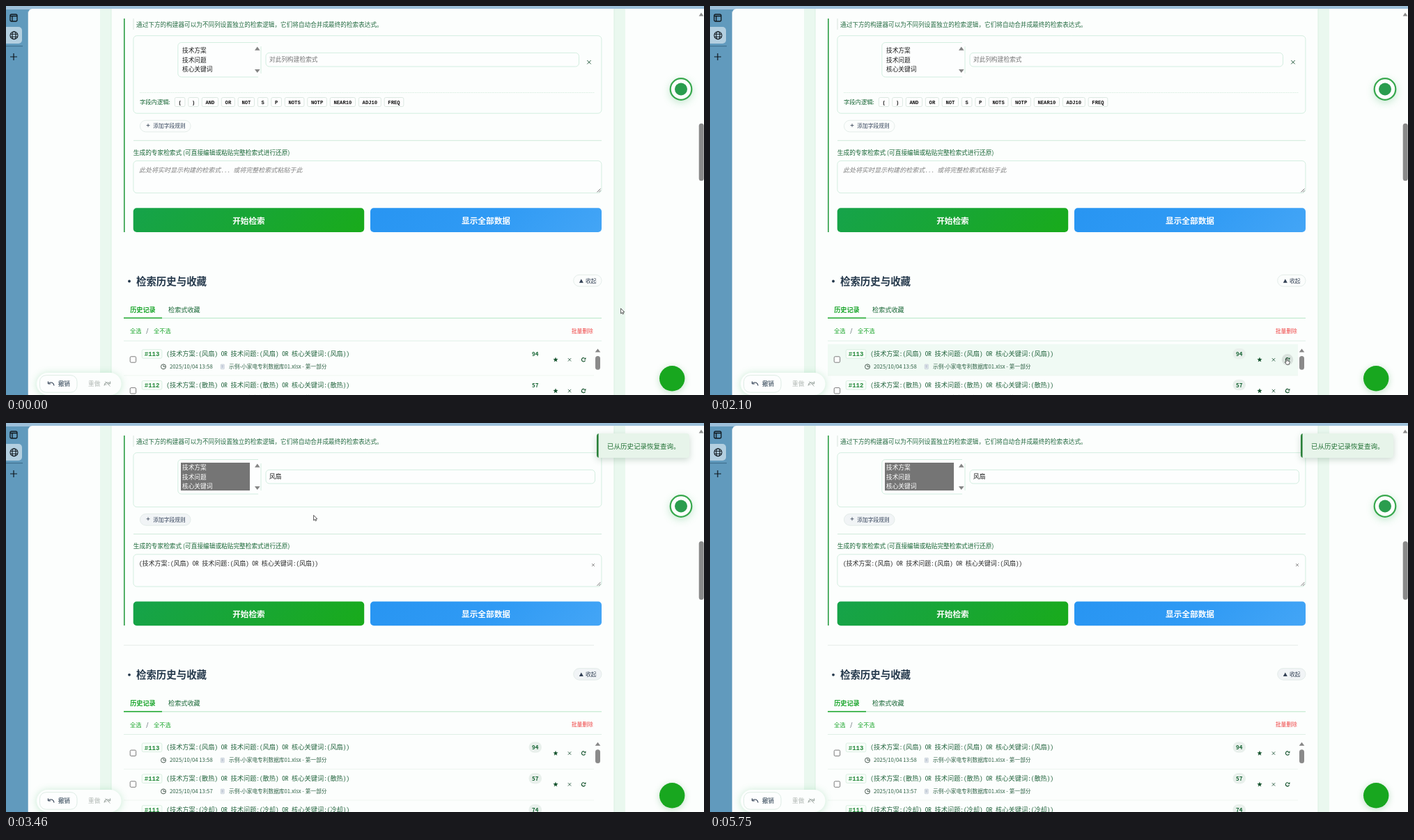
Write an HTML page with a canvas that moves like this. It is 1002 px wide and 559 px high and loops after 5890 ms.

```html
<!DOCTYPE html>
<html lang="zh-CN">
<head>
<meta charset="utf-8">
<title>检索历史</title>
<style>
html, body { margin: 0; width: 100%; height: 100%; overflow: hidden; background: #fcfefd; }
canvas { display: block; width: 1002px; height: 559px; }
</style>
</head>
<body>
<canvas id="stage"></canvas>
<script>
const W = 1002, H = 559, LOOP = 5890;
const canvas = document.getElementById('stage');
const dpr = window.devicePixelRatio || 1;
canvas.width = W * dpr;
canvas.height = H * dpr;
const g = canvas.getContext('2d');

const SANS = '"Noto Sans CJK SC", "Noto Sans SC", sans-serif';
const WIDE = '"Noto Sans Mono CJK SC", "Noto Sans CJK SC", monospace';
const MONO = '"Liberation Mono", monospace';
const GREEN = '#19a52a', FOREST = '#166534', SLATE = '#334155', LINE = '#d3eee0';

// time, x, y, shape
const PATH = [
  [0, 882, 434, 'arrow'], [430, 800, 480, 'arrow'], [560, 640, 520, 'arrow'], [690, 549, 532, 'arrow'],
  [840, 522, 545, 'arrow'], [1000, 530, 526, 'arrow'], [1150, 530, 523, 'arrow'], [1290, 531, 521, 'arrow'],
  [1540, 596, 517, 'arrow'], [1690, 700, 513, 'arrow'], [1810, 808, 505, 'arrow'], [1960, 825, 506, 'hand'],
  [2500, 829, 505, 'busy'], [2910, 829, 505, 'arrow'], [3310, 770, 385, 'arrow'], [3460, 441, 132, 'arrow'],
  [3590, 360, 148, 'arrow'], [3710, 332, 154, 'arrow'], [3850, 327, 192, 'beam'], [4260, 280, 165, 'arrow'],
  [4390, 240, 107, 'arrow'], [4510, 235, 138, 'hand'], [4670, 235, 147, 'hand'], [4810, 479, 243, 'arrow'],
  [4940, 0, 0, 'none'], [5210, 998, 546, 'arrow'], [5360, 993, 545, 'arrow'], [5490, 992, 545, 'arrow'],
  [5630, 988, 550, 'arrow'], [5750, 0, 0, 'none']
];

const within = (t, a, b) => t >= a && t < b;

function text(s, x, y, size, color, o = {}) {
  g.font = `${o.style || ''} ${o.weight || 400} ${size}px ${o.font || SANS}`;
  g.textAlign = o.align || 'left';
  g.fillStyle = color;
  g.fillText(s, x, y + size * 0.37);
}

function box(x, y, w, h, r, fill, stroke, lw = 1) {
  g.beginPath();
  g.roundRect(x, y, w, h, r);
  if (fill) { g.fillStyle = fill; g.fill(); }
  if (stroke) { g.strokeStyle = stroke; g.lineWidth = lw; g.stroke(); }
}

function rect(x, y, w, h, fill) {
  g.fillStyle = fill;
  g.fillRect(x, y, w, h);
}

function disc(x, y, r, fill, stroke, lw = 1) {
  g.beginPath();
  g.arc(x, y, r, 0, Math.PI * 2);
  if (fill) { g.fillStyle = fill; g.fill(); }
  if (stroke) { g.strokeStyle = stroke; g.lineWidth = lw; g.stroke(); }
}

function lines(points, color, lw = 1) {
  g.beginPath();
  for (const [x1, y1, x2, y2] of points) { g.moveTo(x1, y1); g.lineTo(x2, y2); }
  g.strokeStyle = color;
  g.lineWidth = lw;
  g.stroke();
}

function shape(points, fill, stroke, lw = 1) {
  g.beginPath();
  points.forEach(([x, y], i) => i ? g.lineTo(x, y) : g.moveTo(x, y));
  g.closePath();
  if (fill) { g.fillStyle = fill; g.fill(); }
  if (stroke) { g.strokeStyle = stroke; g.lineWidth = lw; g.stroke(); }
}

function shadow(color, blur, dy, draw) {
  g.save();
  g.shadowColor = color;
  g.shadowBlur = blur * dpr;
  g.shadowOffsetY = dy * dpr;
  draw();
  g.restore();
}

function at(x, y, draw) {
  g.save();
  g.translate(x, y);
  draw();
  g.restore();
}

const cross = (x, y, r, color, lw = 1) =>
  lines([[x - r, y - r, x + r, y + r], [x - r, y + r, x + r, y - r]], color, lw);
const plus = (x, y, r, color, lw = 1) =>
  lines([[x - r, y, x + r, y], [x, y - r, x, y + r]], color, lw);
const tri = (x, y, w, h, color) => shape([[x - w, y + h], [x + w, y + h], [x, y - h]], color);

function star(x, y) {
  const pts = [];
  for (let i = 0; i < 10; i++) {
    const a = -Math.PI / 2 + i * Math.PI / 5, r = i % 2 ? 1.6 : 3.8;
    pts.push([x + r * Math.cos(a), y + r * Math.sin(a)]);
  }
  shape(pts, '#14532d');
}

function refresh(x, y) {
  g.beginPath();
  g.arc(x, y, 2.6, 0.3, 5.3);
  g.strokeStyle = '#14532d';
  g.lineWidth = 1.1;
  g.stroke();
  shape([[x + 3.4, y - 3.4], [x + 3.4, y - 0.4], [x + 0.5, y - 0.6]], '#14532d');
}

function frame() {
  rect(0, 0, W, H, '#619abd');
  rect(0, 0, W, 5, '#9dc0da');
  box(32, 4, 980, 570, 6, '#fcfefd');
  rect(31, 8, 1, H, '#8db4cd');
  rect(135, 4, 16, H, '#eaf8ef');
  rect(873, 4, 16, H, '#eaf8ef');
  rect(151, 4, 722, H, '#fcfefd');
  rect(150.5, 4, 1, H, '#d9f0e1');
  rect(872.5, 4, 1, H, '#d9f0e1');

  box(6, 12, 10, 10, 2, null, '#10181e', 1.3);
  lines([[6, 14.5, 16, 14.5], [9, 14, 9, 22]], '#10181e', 1.3);
  box(-5, 30, 28, 24, 5, '#b3cfe0');
  disc(11.5, 42.3, 5.5, null, '#10181e', 1.1);
  g.beginPath();
  g.ellipse(11.5, 42.3, 2.5, 5.5, 0, 0, Math.PI * 2);
  g.stroke();
  lines([[6.5, 40.5, 16.5, 40.5], [6.5, 44.2, 16.5, 44.2]], '#10181e', 0.9);
  rect(0, 57, 24, 1.2, '#3f718f');
  plus(11, 73, 5, '#10181e', 1.2);
}

function operators() {
  text('字段内逻辑:', 192, 138, 8.3, FOREST, { weight: 500 });
  let x = 242;
  for (const op of ['(', ')', 'AND', 'OR', 'NOT', 'S', 'P', 'NOTS', 'NOTP', 'NEAR10', 'ADJ10', 'FREQ']) {
    const w = 10.9 + op.length * 4.33;
    box(x + 0.3, 131.5, w - 0.6, 13, 2, '#fefefe', '#d5e3db', 0.8);
    text(op, x + w / 2, 138.3, 7.2, '#111', { font: MONO, weight: 700, align: 'center' });
    x += w + 4.25;
  }
}

function builder(restored) {
  const bottom = restored ? 291 : 325;
  rect(169, 18, 1.6, bottom - 18, '#2b9d45');
  rect(182.6, 18, 0.8, 16, '#cfded5');
  text('通过下方的构建器可以为不同列设置独立的检索逻辑，它们将自动合并成最终的检索表达式。', 187, 26.3, 8.65, '#256b42');
  box(182.9, 42.7, 672, restored ? 78 : 111.5, 5, null, LINE);
  box(246.8, 52.5, 119.5, 49.5, 5, '#fdfefe', null);
  g.beginPath();
  g.moveTo(362, 52.5);
  g.arcTo(246.8, 52.5, 246.8, 60, 5);
  g.arcTo(246.8, 102, 260, 102, 5);
  g.lineTo(362, 102);
  g.moveTo(366, 58);
  g.lineTo(366, 97);
  g.strokeStyle = LINE;
  g.lineWidth = 1;
  g.stroke();
  if (restored) rect(251, 57, 99, 40, '#757575');
  ['技术方案', '技术问题', '核心关键词'].forEach((s, i) =>
    text(s, 253, 64 + i * 13.4, 8.66, restored ? '#fff' : '#1c1c1c'));
  tri(360.8, 61.2, 3.8, 2.6, '#858585');
  tri(360.8, 93.5, 3.8, -2.6, '#858585');
  box(373, 67.3, restored ? 472.5 : 449.5, 19.7, 5, '#fdfefe', LINE);
  text(restored ? '风扇' : '对此列构建检索式', 378, 77, 8.7, restored ? '#1c1c1c' : '#757575');
  if (restored) return;
  cross(837, 80.7, 2.7, '#285b40', 1);
  g.save();
  g.setLineDash([1.5, 1]);
  lines([[192, 124.5, 845, 124.5]], '#cfe9da', 0.8);
  g.restore();
  operators();
}

function button(x, w, label, stops) {
  const grad = g.createLinearGradient(x + w / 2 - 90, 308 - 90, x + w / 2 + 90, 308 + 90);
  stops.forEach((c, i) => grad.addColorStop(i / (stops.length - 1), c));
  box(x, 290.3, w, 34.7, 5, grad);
  text(label, x + w / 2, 308.3, 11.65, '#fff', { weight: 700, align: 'center' });
}

function editor(t) {
  const filled = t >= 2640, pill = filled ? '#f1f4f6' : '#fbfdfc';
  box(192.4, 164.3, 72.7, 16.6, 8.3, within(t, 4510, 4810) ? '#e0e7ef' : pill, '#dfe9e5', 0.8);
  plus(204, 171.5, 2.4, SLATE, 0.8);
  text('添加字段规则', 211.3, 172.6, 7.75, '#36455c');
  rect(183, 192.8, 672, 1, '#cfe9da');
  text('生成的专家检索式 (可直接编辑或粘贴完整检索式进行还原)', 182.8, 210.4, 8.68, FOREST, { weight: 500 });
  const hot = within(t, 3990, 4260);
  box(182.9, 222.5, 672, 46.2, 5, '#fdfefe', hot ? '#8edcae' : LINE);
  if (filled) {
    text('(技术方案:(风扇) OR 技术问题:(风扇) OR 核心关键词:(风扇))', 191, 235.4, 9.02, '#2b2b2b', { font: WIDE });
    cross(843, 237.7, 2, '#888', 0.9);
  } else {
    text('此处将实时显示构建的检索式... 或将完整检索式粘贴于此', 191, 235.2, 9.02, '#808080', { font: WIDE, style: 'italic' });
  }
  lines([[848.5, 267.5, 853.5, 262.5], [851.2, 267.5, 853.5, 265.2]], '#555', 0.8);
  button(182.7, 331.5, '开始检索', ['#16a34a', '#18a634', '#19ab1b']);
  button(523, 332, '显示全部数据', ['#2895f2', '#2f9af4', '#43a5f6']);
  if (t >= 2910) rect(169, 352.5, 675, 0.8, '#dfe8e3');

  disc(177, 395.5, 1.9, '#24384b');
  text('检索历史与收藏', 187, 395.5, 14.45, '#24384b', { weight: 700 });
  box(814.7, 386.3, 40.3, 16.6, 8.3, pill, '#dfe9e5', 0.8);
  tri(825.8, 395, 3, 2.8, SLATE);
  text('收起', 832, 395, 7.75, SLATE, { weight: 500 });
  text('历史记录', 178.2, 436.3, 9.15, GREEN, { weight: 700 });
  text('检索式收藏', 233, 436.5, 9.15, FOREST, { weight: 500 });
  rect(169, 448, 686, 1, '#b9e7c8');
  rect(169, 447.6, 55, 1.5, GREEN);
  text('全选', 178, 467.2, 8.2, GREEN);
  text('/', 201.3, 467.2, 8.2, '#36454f');
  text('全不选', 212, 467.2, 8.2, GREEN);
  text('批量删除', 811.8, 467.2, 7.75, '#ef4444');
  rect(169, 480.7, 686, 0.9, '#dceee4');
}

function row(i, t, id, word, count, time) {
  const restored = t >= 2500;
  const y = 486 + i * 44.8;
  const hover = i === 0 ? within(t, 1150, 2500) : i === 1 && within(t, 690, 1150);
  if (hover) rect(169, y, 675, 44.8, '#f0faf4');
  rect(169, y + 44.6, 675, 0.7, '#e8f2ec');
  box(178.2, y + 17.8, 8.4, 8.4, 1.5, '#fff', '#6d6d6d', 0.9);
  box(195.2, y + 7.7, 28.6, 12.6, 2, '#f8fdf9', '#d3ecdc', 0.8);
  text('#' + id, 209.6, y + 14, 9, '#218838', { font: MONO, weight: 700, align: 'center' });
  text(`(技术方案:(${word}) OR 技术问题:(${word}) OR 核心关键词:(${word}))`, 230.3, y + 13.7, 9.23, '#24653f', { font: WIDE });
  if (within(t, 560, 2500) || t >= 2640) box(750.5, y + 6, 18.5, 15.5, 7.7, '#e9f0ec');
  text(count, 759.7, y + 14, 8, FOREST, { weight: 700, align: 'center' });

  disc(226, y + 32.3, 3.5, null, '#4a5b52', 1);
  lines([[226, y + 30, 226, y + 32.5], [226, y + 32.3, 229, y + 32.3]], '#4a5b52', 0.9);
  text('2025/10/04 ' + time, 235, y + 32.3, 7.78, '#2f6246');
  box(308.3, y + 29, 5, 6.6, 0.6, '#e4e9f0', '#b7c2cc', 0.6);
  lines([[309.5, y + 31, 312, y + 31], [309.5, y + 33, 312, y + 33]], '#8897aa', 0.7);
  text('示例-小家电专利数据库01.xlsx - 第一部分', 320, y + 32.3, 7.7, '#2f6246');

  star(789, y + 22.3);
  if (i === 0 && within(t, 1810, 1960)) disc(809, y + 22.3, 8, '#e1e8e4');
  cross(809, y + 22.3, 2.2, '#285b40', 0.9);
  if (i === 0 && within(t, 1960, 2640)) disc(829, y + 22.3, 8.2, t < 2100 ? '#e6ede9' : '#d9e2dd');
  refresh(829, y + 22.3);
}

function history(t) {
  row(0, t, '113', '风扇', '94', '13:58');
  row(1, t, '112', '散热', '57', '13:57');
  if (t >= 2500) row(2, t, '111', '冷却', '74', '13:57');
  tri(849.5, 495, 3.8, 2.5, '#858585');
  box(846, 503, 7, 19.8, 3.5, '#8a8a8a');
}

function undoArrow() {
  g.beginPath();
  g.moveTo(-3, -1);
  g.bezierCurveTo(0, -3, 4, -2, 4.5, 2.5);
  g.stroke();
  lines([[-4, -3.5, -4, 0], [-4, 0, -0.5, 0]], g.strokeStyle, 1.2);
}

function overlays(t) {
  tri(998, 12, 3.4, 2.5, '#8a8a8a');
  const top = t >= 2500 ? 170 : 168.7;
  box(994.7, top, 7, t >= 2500 ? 84 : 82.5, 3.5, '#8a8a8a');

  shadow('rgba(40,170,80,.28)', 12, 3, () => disc(969, 119.5, 16, '#fff'));
  disc(969, 119.5, 15.3, '#fcfffd', '#37a84d', 2.2);
  disc(969, 119.5, 9, '#2a9d4e');
  shadow('rgba(20,140,40,.25)', 10, 2, () => disc(956.2, 535.3, 18.2, '#18a71f'));

  shadow('rgba(60,180,100,.28)', 11, 1, () => box(44, 527, 121.5, 32, 16, '#fcfefd'));
  box(48.5, 530.7, 53.5, 24.5, 9, '#fdfefe', '#dbeae2', 0.9);
  g.strokeStyle = SLATE;
  g.lineWidth = 1.2;
  at(64.5, 543, undoArrow);
  text('撤销', 74.7, 543.2, 8.65, '#24384b', { weight: 500 });
  text('重做', 118, 543.2, 8.65, '#b2b9b5');
  at(145.5, 543, () => {
    g.scale(-1, 1);
    g.strokeStyle = '#9ca6a1';
    g.lineWidth = 1.2;
    undoArrow();
    lines([[-4, 3.5, 3, -3.5], [1, 1, 4, 1]], '#9ca6a1', 0.9);
  });

  if (t < 2640) return;
  g.save();
  g.globalAlpha = t < 2770 ? 0.4 : t < 2910 ? 0.85 : 1;
  shadow('rgba(40,90,60,.22)', 10, 3, () => box(848, 15, 133, 35, 4, '#e7f4ea'));
  g.beginPath();
  g.roundRect(848, 15, 133, 35, 4);
  g.clip();
  rect(848, 15, 2.6, 35, '#2a8039');
  text('已从历史记录恢复查询。', 863, 33.2, 9.5, '#1f6f32', { weight: 500 });
  g.restore();
}

function pointer(t) {
  let now = PATH[0];
  for (const p of PATH) if (t >= p[0]) now = p;
  const [, x, y, kind] = now;
  if (kind === 'none') return;
  at(x, y, () => {
    if (kind === 'beam') {
      lines([[2, 0, 2, 9], [0.5, 0, 3.5, 0], [0.5, 9, 3.5, 9]], '#333', 0.8);
    } else if (kind === 'hand') {
      g.beginPath();
      g.moveTo(2, 6);
      g.lineTo(2, 1);
      g.quadraticCurveTo(2.8, -0.2, 3.6, 1);
      g.lineTo(3.6, 3.8);
      g.lineTo(6.8, 4.4);
      g.quadraticCurveTo(7.4, 5, 7, 6.4);
      g.lineTo(6.2, 9.2);
      g.lineTo(2.8, 9.2);
      g.lineTo(0.2, 5.8);
      g.quadraticCurveTo(0.5, 4.6, 2, 6);
      g.fillStyle = '#fff';
      g.fill();
      g.strokeStyle = '#333';
      g.lineWidth = 0.8;
      g.stroke();
    } else {
      shape([[0.6, 0.6], [0.6, 8], [2.3, 6.5], [3.4, 8.8], [4.6, 8.2], [3.6, 6], [5.8, 5.8]], '#fff', '#333', 0.8);
      if (kind === 'busy') disc(6, 1.8, 2.8, null, '#2d8fdc', 1.4);
    }
  });
}

function draw(t) {
  const restored = t >= 2500;
  g.setTransform(dpr, 0, 0, dpr, 0, 0);
  frame();
  builder(restored);
  at(0, restored ? -33.7 : 0, () => {
    editor(t);
    history(t);
  });
  overlays(t);
  pointer(t);
}

const start = performance.now();
function tick() {
  draw((performance.now() - start) % LOOP);
  requestAnimationFrame(tick);
}
tick();
</script>
</body>
</html>
```
